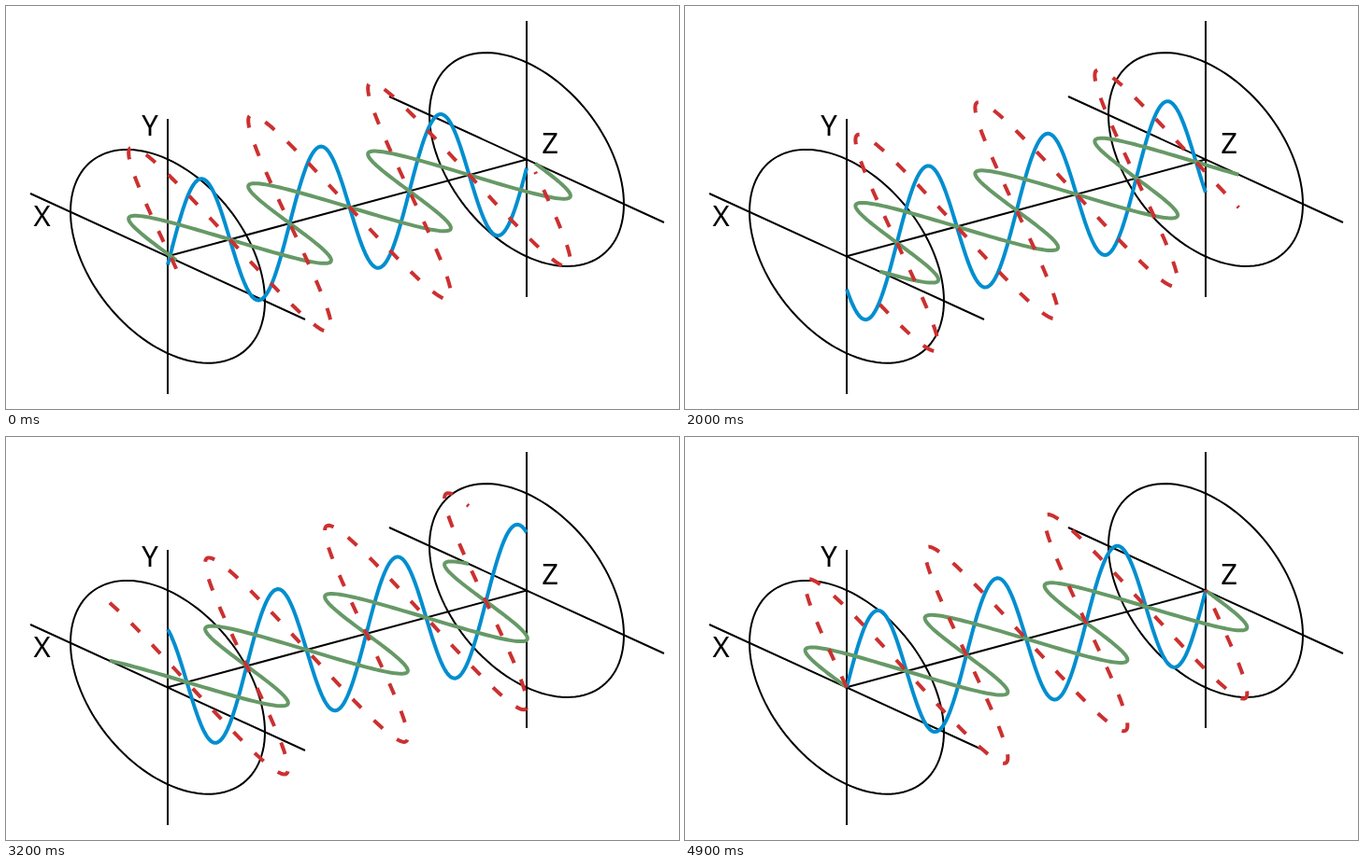
Recreate the animation shown at these times as an HTML page. Size 720 px wide and 432 px high, loop 5 s.

```html
<!DOCTYPE html>
<html lang="en">
<head>
<meta charset="utf-8">
<title>Linear polarization</title>
<style>
  html, body { margin: 0; width: 100%; height: 100%; overflow: hidden; background: #fff; }
  svg { display: block; width: 720px; height: 432px; }
  path { fill: none; }
  .frame { stroke: #000; stroke-width: 2; }
  .wave { stroke-width: 4; stroke-linejoin: round; }
  #vertical { stroke: #008ecf; }
  #horizontal { stroke: #669966; }
  #sum { stroke: #cc3030; stroke-dasharray: 13 18.95; }
  text {
    font: 400 31px "Noto Sans", "Open Sans", sans-serif;
    font-stretch: 62.5%;
    text-anchor: middle;
  }
</style>
</head>
<body>
<svg viewBox="0 0 720 432">
  <g class="frame">
    <path d="M173 121V416M26 201L320 336M557 16V312M410 97L704 232M173 268.3L557 164.5"/>
    <path id="near"/>
    <path id="far"/>
  </g>
  <path class="wave" id="vertical"/>
  <path class="wave" id="horizontal"/>
  <path class="wave" id="sum"/>
  <text x="38.5" y="236">X</text>
  <text x="154" y="139">Y</text>
  <text x="582" y="158">Z</text>
</svg>
<script>
const LOOP = 5000, STEPS = 50;
const START = { x: 173, y: 268.3 }, END = { x: 557, y: 164.5 };
const CYCLES = 3, POINTS = 300;
const RADIUS = 104, SLOPE = 0.459;
const AMP = RADIUS / Math.SQRT2;

const byId = id => document.getElementById(id);

function trace(id, count, pointAt) {
  const pts = [];
  for (let i = 0; i <= count; i++) {
    pts.push(pointAt(i / count).map(v => v.toFixed(2)).join(" "));
  }
  byId(id).setAttribute("d", "M" + pts.join("L"));
}

// A circle seen in the skewed X/Y plane
function ring(id, c) {
  trace(id, 120, u => {
    const a = u * 2 * Math.PI, x = RADIUS * Math.cos(a);
    return [c.x + x, c.y + SLOPE * x + RADIUS * Math.sin(a)];
  });
}

function wave(id, phase, alongX, alongY) {
  trace(id, POINTS, u => {
    const s = AMP * Math.sin(2 * Math.PI * (u * CYCLES - phase));
    return [
      START.x + (END.x - START.x) * u - alongX * s,
      START.y + (END.y - START.y) * u - (alongX * SLOPE + alongY) * s
    ];
  });
}

function draw(ms) {
  const step = Math.floor(ms / LOOP * STEPS) % STEPS;
  const phase = (step + 1) / STEPS;
  wave("vertical", phase, 0, 1);
  wave("horizontal", phase, 1, 0);
  wave("sum", phase, 1, 1);
}

ring("near", START);
ring("far", END);

const begin = performance.now();
function tick() {
  draw(performance.now() - begin);
  requestAnimationFrame(tick);
}
tick();
</script>
</body>
</html>
```
